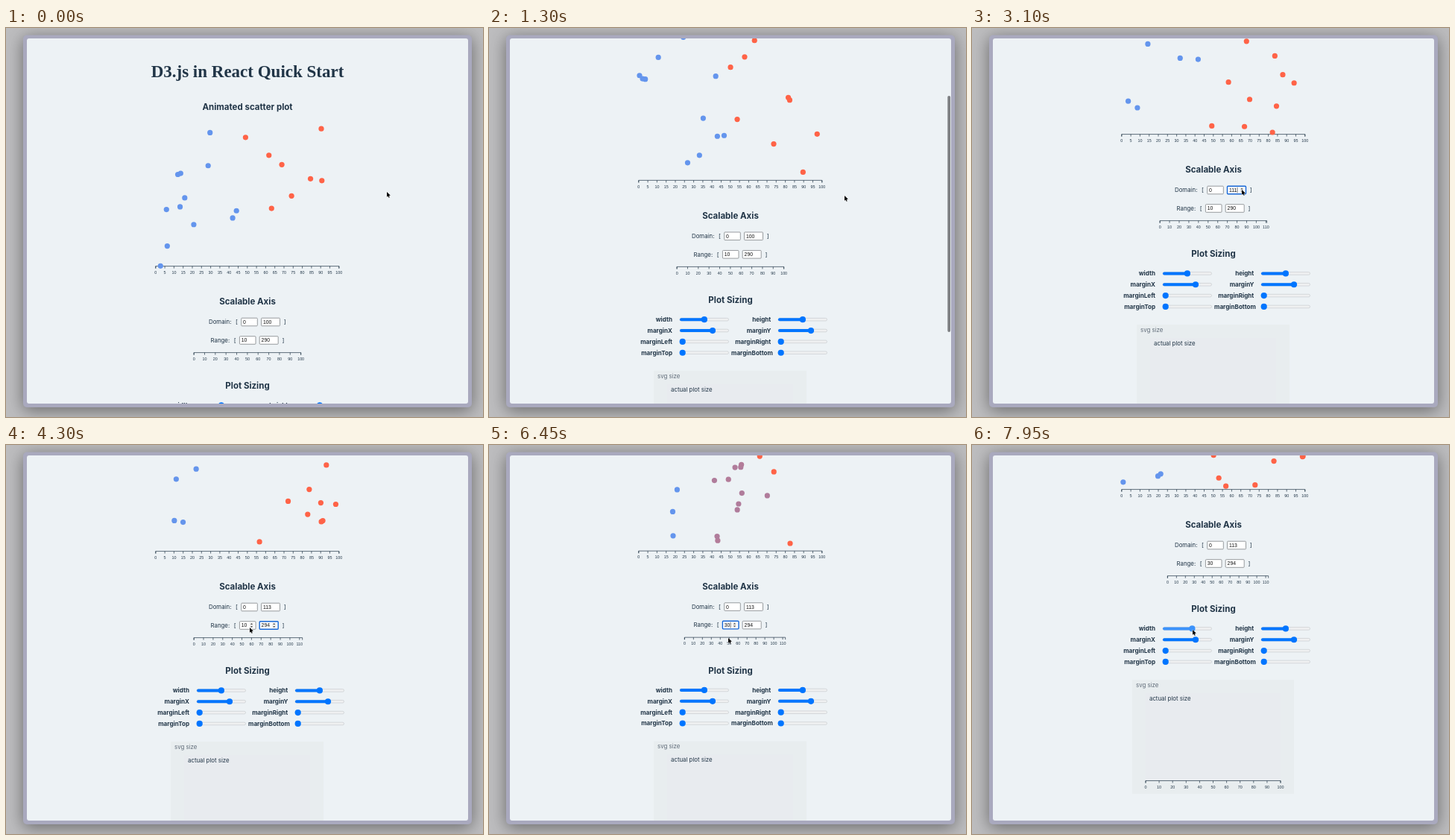
These frames come from a looping animation (640 by 522 pixels, 8 s). An HTML page with a canvas:

```html
<!DOCTYPE html>
<html lang="en">
<head>
<meta charset="utf-8">
<title>D3.js in React Quick Start</title>
<style>
  html, body { margin: 0; width: 100%; height: 100%; overflow: hidden; background: #bdbdbf; }
  canvas { display: block; }
</style>
</head>
<body>
<canvas id="stage" width="640" height="522"></canvas>
<script>
const ctx = document.getElementById('stage').getContext('2d');
const LOOP = 8000, INK = '#213547', BLUE = [100, 149, 237], RED = [255, 99, 71];
const PX = 0.5125; // page zoom
const CENTER = 324, LEFT = 200.8, RIGHT = 446.8, TOP = 124.6, BASE = 319.6;
const SANS = 'Inter, sans-serif', ARIAL = '"Liberation Sans", Arial, sans-serif';

const clamp = v => Math.min(1, Math.max(0, v));
const mix = (a, b, p) => a + (b - a) * p;
const linear = p => p;
const smooth = p => p * p * (3 - 2 * p);
const cubic = p => p < 0.5 ? 4 * p ** 3 : 1 - 4 * (1 - p) ** 3;

// seeded noise in 0..1
function noise(a, b) {
  const v = Math.sin(a * 12.9898 + b * 78.233) * 43758.5453;
  return v - Math.floor(v);
}

// value at time t after a series of moves [start, end, target]
const follow = (value, t, moves, ease = linear) =>
  moves.reduce((v, [from, to, target]) => mix(v, target, ease(clamp((t - from) / (to - from)))), value);

// ---- state at time t ----
function stateAt(t) {
  const scroll = follow(0, t, [[950, 1533, 177], [6440, 6700, 260]], smooth);
  const bar = follow(0, t, [[950, 1000, 1], [1850, 2050, 0], [6480, 6550, 1], [6850, 7000, 0]]);
  const drag = follow(0, t, [[7450, 7950, 6.5]]);
  const max = Math.floor(follow(100, t, [[2600, 3180, 113]]));
  const start = Math.floor(follow(10, t, [[4400, 5050, 30]]));
  const end = Math.floor(follow(290, t, [[3650, 3900, 294]]));
  const focus = t < 2350 || t >= 7450 ? '' : t < 3650 ? 'max' : t < 4400 ? 'end' : 'start';
  return { t, scroll, bar, drag, max, start, end, focus, cursor: cursorAt(t, drag) };
}

function cursorAt(t, drag) {
  const moves = [[350, 700, 477, 225], [1550, 2000, 362, 217], [3350, 3600, 361, 240],
    [3900, 4300, 327, 245], [5000, 5150, 321, 259], [7050, 7350, 289.5, 248]];
  const along = (from, axis) =>
    follow(from, t, moves.map(m => [m[0], m[1], m[2 + axis]]), smooth);
  return { x: along(511, 0) + drag, y: along(220, 1) };
}

// ---- drawing helpers ----
function text(str, x, y, size, { align = 'left', weight = 400, family = SANS, color = INK } = {}) {
  ctx.font = `${weight} ${size}px ${family}`;
  ctx.textAlign = align;
  ctx.fillStyle = color;
  ctx.fillText(str, x, y + size * 0.36);
}

function box(x, y, w, h, r, fill, stroke, line = 1) {
  ctx.beginPath();
  ctx.roundRect(x, y, w, h, r);
  ctx.fillStyle = fill;
  ctx.fill();
  if (!stroke) return;
  ctx.strokeStyle = stroke;
  ctx.lineWidth = line;
  ctx.stroke();
}

function disc(x, y, r, fill) {
  ctx.beginPath();
  ctx.arc(x, y, r, 0, 7);
  ctx.fillStyle = fill;
  ctx.fill();
}

function axis(x0, x1, y, max, step) {
  const at = v => mix(x0, x1, v / max);
  ctx.strokeStyle = INK;
  ctx.lineWidth = 0.7;
  ctx.beginPath();
  ctx.moveTo(x0, y + 3);
  ctx.lineTo(x0, y);
  ctx.lineTo(x1, y);
  ctx.lineTo(x1, y + 3);
  for (let v = 0; v <= max; v += step) {
    ctx.moveTo(at(v), y);
    ctx.lineTo(at(v), y + 3);
  }
  ctx.stroke();
  for (let v = 0; v <= max; v += step)
    text(v, at(v), y + 8.3, 5.4, { align: 'center', family: ARIAL });
}

function numberInput(value, x, y, w, focused, hovered, caret) {
  box(x, y - 5.3, w, 10.6, 1, '#fff', focused ? '#1767d6' : '#808488', focused ? 1.4 : 0.8);
  text(value, x + 2.4, y, 6.85, { family: ARIAL, color: '#111' });
  if (caret) {
    ctx.fillRect(x + 2.8 + ctx.measureText(value).width, y - 3.8, 0.6, 7.6);
  }
  if (!focused && !hovered) return;
  const cx = x + w - 5.5;
  box(cx - 2.8, y - 4, 5.6, 8, 1, '#efefef');
  ctx.fillStyle = '#505050';
  for (const s of [-1, 1]) {
    ctx.beginPath();
    ctx.moveTo(cx - 1.5, y + s);
    ctx.lineTo(cx + 1.5, y + s);
    ctx.lineTo(cx, y + s * 3);
    ctx.fill();
  }
}

function slider(x, y, offset, color) {
  box(x, y - 1.8, 65.5, 3.6, 1.8, '#eff0f1', '#c3c6c9', 0.6);
  box(x, y - 2, offset, 4, 2, color);
  disc(x + offset, y, 4.1, color);
}

// ---- page parts ----
function drawWindow() {
  ctx.fillStyle = '#bdbdbf';
  ctx.fillRect(0, 0, 640, 522);
  ctx.save();
  ctx.shadowColor = 'rgba(0,0,0,.45)';
  ctx.shadowBlur = 22;
  ctx.shadowOffsetY = 4;
  box(23, 9.5, 602, 499.5, 5, '#a9a9be');
  ctx.restore();
  box(28, 14, 592, 490, 3, '#edf2f5');
}

// random data, replaced about once a second
function drawDots(t) {
  const round = Math.floor((t - 270) / 997);
  const p = cubic(clamp((t - 270 - 997 * round) / 400));
  const dot = (i, k) => {
    const x = noise(i + 1, k + 3);
    return { x, y: noise(i + 41, k + 3), hue: x < 0.49 ? BLUE : RED };
  };
  ctx.save();
  ctx.beginPath();
  ctx.rect(190, TOP, 270, 215);
  ctx.clip();
  for (let i = 0; i < 20; i++) {
    const a = dot(i, Math.max(0, round)), b = dot(i, round + 1);
    const rgb = a.hue.map((c, j) => Math.round(mix(c, b.hue[j], p)));
    disc(mix(LEFT, RIGHT, mix(a.x, b.x, p)), mix(TOP, BASE, mix(a.y, b.y, p)), 3.6, `rgb(${rgb})`);
  }
  ctx.restore();
}

function drawAxisForm({ t, scroll, max, start, end, focus, cursor }) {
  const field = (name, value, x, y, w) => {
    const focused = focus === name;
    const hovered = Math.abs(cursor.x - x - w / 2) < w / 2 && Math.abs(cursor.y + scroll - y) < 5.5;
    numberInput(value, x, y, w, focused, hovered, focused && t % 900 < 600);
  };
  const row = (label, x, y, left, low, high) => {
    text(label, x, y, 7.85);
    text('[', left - 7.7, y, 7.85);
    text(']', left + 57, y, 7.85);
    field(...low, left, y, 21.6);
    field(...high, left + 26.8, y, 25);
  };
  row('Domain:', 272, 394.5, 315.7, ['min', 0], ['max', max]);
  row('Range:', 274.5, 419, 313.4, ['start', start], ['end', end]);
  axis(247 + start * PX, 247 + end * PX, 435.6, max, 10);
}

function drawSizing({ t, drag }) {
  const column = (x, first, side, names, value) =>
    [first, ...names.map(n => 'margin' + n)].forEach((label, i) => {
      const y = 506.4 + i * 14.85;
      const font = { weight: 700, align: 'right' };
      // labels too long for their cell spill over to the right
      ctx.font = `700 8.1px ${SANS}`;
      const spill = Math.max(0, ctx.measureText(label).width - 53.3);
      text(label, x + side + spill, y, 8.1, font);
      const active = label === 'width' && t > 7350;
      slider(x, y, [value, 44][i] ?? 3.7, active ? '#3b92fb' : '#0075ff');
    });
  column(256, 'width', -10, ['X', 'Left', 'Top'], 32.9 + drag);
  column(388, 'height', -9.7, ['Y', 'Right', 'Bottom'], 32.9);

  const width = 205 + drag * 1.85, left = CENTER - 0.5 - width / 2;
  box(left, 575, width, 153, 0, '#e8edef');
  box(left + 18, 593, width - 36, 117.5, 0, '#e8ebef');
  text('svg size', left + 5, 582, 7.85, { color: '#5f6b78' });
  text('actual plot size', left + 23, 600, 7.85);
  axis(left + 18, left + width - 18, 710.5, 100, 10);
}

function drawCursor({ x, y }) {
  ctx.save();
  ctx.translate(x, y);
  ctx.scale(0.85, 0.85);
  const arrow = new Path2D('M0 0V8L1.9 6.4 3 9 4.4 8.4 3.3 5.9 5.7 5.7Z');
  ctx.strokeStyle = '#fff';
  ctx.stroke(arrow);
  ctx.fillStyle = '#000';
  ctx.fill(arrow);
  ctx.restore();
}

function draw(t) {
  const state = stateAt(t);
  const heading = (str, y) => text(str, CENTER, y, 11.5, { align: 'center', weight: 700 });
  drawWindow();
  ctx.save();
  ctx.beginPath();
  ctx.roundRect(28, 14, 592, 490, 3);
  ctx.clip();
  ctx.translate(0, -state.scroll);
  text('D3.js in React Quick Start', CENTER, 58, 23,
    { align: 'center', weight: 700, family: '"Liberation Serif", Times, serif' });
  heading('Animated scatter plot', 105.7);
  heading('Scalable Axis', 367);
  heading('Plot Sizing', 480);
  axis(LEFT, RIGHT, BASE, 100, 5);
  drawDots(t);
  drawAxisForm(state);
  drawSizing(state);
  ctx.restore();

  ctx.globalAlpha = state.bar;
  box(615.3, 16 + state.scroll * 0.65, 3.8, 317, 1.9, '#7d7f82');
  ctx.globalAlpha = 1;
  drawCursor(state.cursor);
}

function tick() {
  draw(performance.now() % LOOP);
  requestAnimationFrame(tick);
}
tick();
</script>
</body>
</html>
```
